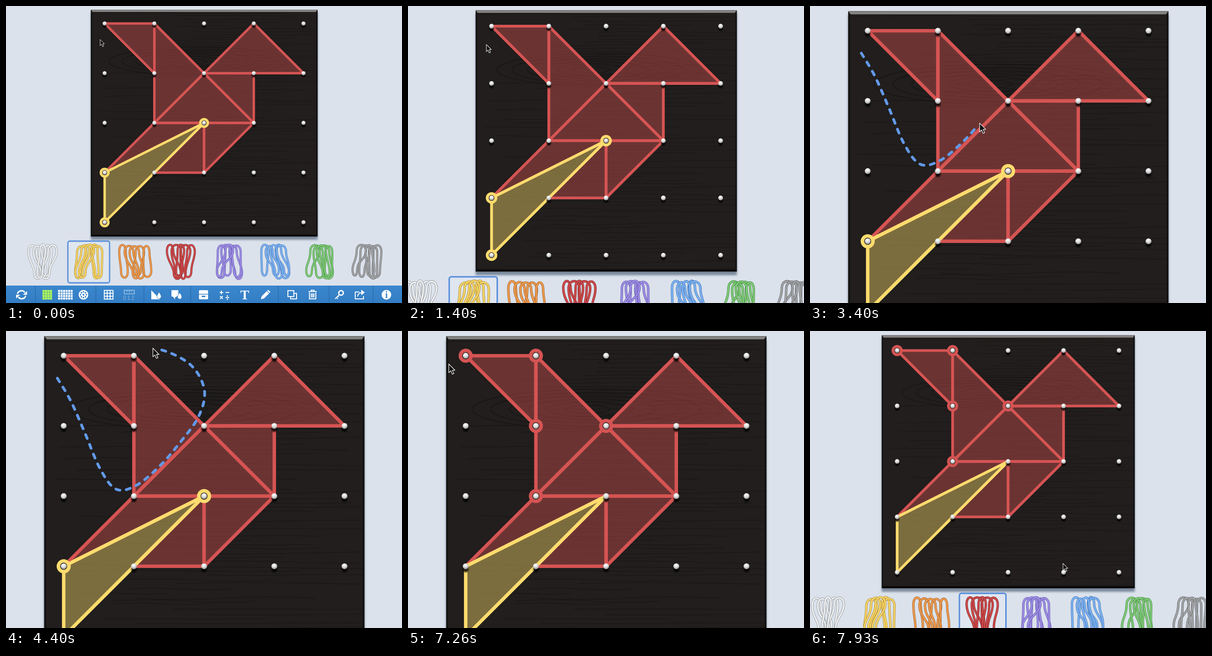
Animation of 864 by 648 pixels, one loop 8000 ms. Source, as an HTML page:

```html
<!DOCTYPE html>
<html lang="en">
<head>
<meta charset="utf-8">
<title>Geoboard</title>
<style>
html, body { margin: 0; width: 100%; height: 100%; overflow: hidden; background: #dbe2ec; }
svg { display: block; width: 100vw; height: 100vh; }
text { font-family: "Liberation Serif", serif; fill: #fff; text-anchor: middle; }
.line { fill: none; stroke: #fff; stroke-width: 2; }
.band { fill: none; stroke-linejoin: round; }
</style>
</head>
<body>
<svg viewBox="0 0 864 648">
  <defs>
    <radialGradient id="pinFill" cx=".45" cy=".3" r=".7">
      <stop offset="0" stop-color="#fff"/><stop offset=".5" stop-color="#dedede"/><stop offset="1" stop-color="#8f8f8f"/>
    </radialGradient>
    <linearGradient id="bevel" x2="0" y2="1">
      <stop offset="0" stop-color="#6c6d70"/><stop offset=".35" stop-color="#878683"/><stop offset="1" stop-color="#827f7a"/>
    </linearGradient>
    <linearGradient id="barFill" x2="0" y2="1">
      <stop offset="0" stop-color="#3a86cd"/><stop offset="1" stop-color="#337dc3"/>
    </linearGradient>
    <filter id="soft" x="-10%" y="-10%" width="120%" height="120%"><feGaussianBlur stdDeviation="2"/></filter>
    <filter id="pinSoft" x="-50%" y="-50%" width="200%" height="200%"><feGaussianBlur stdDeviation="1"/></filter>
    <clipPath id="boardClip"><rect x="188" y="13" width="489" height="487"/></clipPath>
    <ellipse id="pinShadow" cy="4.6" rx="4.2" ry="4.6" fill="#000" opacity=".85" filter="url(#pinSoft)"/>
    <circle id="pin" r="4.5" fill="url(#pinFill)"/>
    <path id="drop" d="M0-7C2-3 4.5-1 4.5 3A4.5 4.5 0 0 1-4.5 3C-4.5-1-2-3 0-7Z" fill="#fff" stroke="#3681c8"/>
  </defs>
  <g id="stage">
    <rect x="185" y="14" width="495" height="496" fill="#7c8a9d" filter="url(#soft)"/>
    <rect x="185" y="8" width="495" height="495" fill="#141312"/>
    <rect x="188" y="13" width="489" height="487" fill="#211e1d"/>
    <path d="M185 8H680L676 13H189Z" fill="url(#bevel)"/>
    <path d="M185 503L188 499H677L680 503Z" fill="#080707"/>
    <g id="grain" clip-path="url(#boardClip)" fill="none" stroke="#0e0d0c"></g>
    <g id="shapes"></g>
    <g id="shadows"></g>
    <g id="handlesBefore"></g>
    <g id="handlesAfter"></g>
    <g id="pins"></g>
    <rect id="choice" y="513" width="91" height="91" rx="4" fill="#dfe6ef" stroke="#5b8fdb" stroke-width="2.8"/>
    <g id="bundles"></g>
    <g id="toolbar">
      <rect y="610" width="864" height="40" fill="url(#barFill)"/>
      <path d="M64 610v40M196 610v40M301 610v40M403 610v40M594 610v40M705 610v40M801 610v40" stroke="#2b6dae" stroke-width="1.5"/>
    </g>
    <g transform="translate(432) scale(.7082) translate(-432)">
      <path id="lasso" fill="none" stroke="#6299e8" stroke-width="6" stroke-linecap="round" stroke-linejoin="round" stroke-dasharray="9 14"/>
    </g>
    <path id="cursor" d="M0 0V13.4L3.1 10.5 5.4 15.8 7.8 14.8 5.5 9.6H9.5Z" fill="#111" stroke="#f2f2f2" stroke-width=".9" stroke-linejoin="round"/>
  </g>
</svg>
<script>
const LOOP = 8000, ZOOM = 1.412, MID = 432;
const RED = '#d55453', YELLOW = '#fedc6e';
const el = id => document.getElementById(id);
const add = (id, markup) => el(id).insertAdjacentHTML('beforeend', markup);
const pinX = c => 215.2 + 108.48 * c, pinY = r => 38.2 + 108.45 * r;

let seed = 7;
const rand = () => (seed = seed * 16807 % 2147483647) / 2147483647;
const spread = n => (rand() - .5) * 2 * n;

function drawGrain() {
  let d = '';
  for (let y = 16; y < 500; y += 4 + rand() * 5) {
    const x = 188 + rand() * 250, w = 120 + rand() * 330;
    d += `M${x} ${y}q${w / 4} ${spread(4)} ${w / 2} 0t${w / 2} 0`;
  }
  add('grain', `<path d="${d}" opacity=".32" stroke-width="1.1"/>`);
  for (let i = 0; i < 6; i++)
    add('grain', `<ellipse cx="${404 + i * 3}" cy="121" rx="${34 + i * 32}" ry="${6 + i * 5}" opacity=".4" stroke-width="1.5"/>`);
  for (let i = 0; i < 3; i++)
    add('grain', `<ellipse cx="540" cy="122" rx="${25 + i * 22}" ry="${5 + i * 5}" opacity=".3" stroke-width="1.5"/>`);
}

function drawShapes() {
  const polygon = (corners, color) => {
    const points = corners.split(' ').map(([c, r]) => `${pinX(+c)},${pinY(+r)}`).join(' ');
    add('shapes', `<polygon class="band" points="${points}" style="fill:${color};fill-opacity:.41" stroke="${color}" stroke-width="5.3"/>`);
  };
  ['00 10 11', '10 21 12', '21 12 32', '21 31 32', '21 30 41', '03 12 22', '22 23 13', '22 23 32']
    .forEach(p => polygon(p, RED));
  polygon('03 04 22', YELLOW);
  for (let r = 0; r < 5; r++)
    for (let c = 0; c < 5; c++) {
      add('shadows', `<use href="#pinShadow" x="${pinX(c)}" y="${pinY(r)}"/>`);
      add('pins', `<use href="#pin" x="${pinX(c)}" y="${pinY(r)}"/>`);
    }
}

function drawHandles(id, corners, color) {
  for (const [c, r] of corners.split(' '))
    add(id, `<circle cx="${pinX(+c)}" cy="${pinY(+r)}" r="8.2" fill="#211d1b" fill-opacity=".8" stroke="${color}" stroke-width="5.4"/>`);
}

// Each bundle: band colour, edge colour, extent of the top ends, extent of the bottom ends.
const bundles = [
  ['#f1f2f3', '#8c9196', -31, 31, -32, 28], ['#f8d667', '#a58632', -26, 29, -30, 28],
  ['#ee9b4f', '#a45f22', -35, 31, -31, 35], ['#d04a4b', '#842526', -32, 29, -17, 31],
  ['#9f8fe6', '#6253aa', -22, 28, -32, 31], ['#7db3f3', '#3f72b3', -28, 26, -33, 33],
  ['#80cb79', '#43883f', -22, 26, -31, 32], ['#a3a4a6', '#66686b', -22, 32, -31, 29]];

function drawBundles() {
  bundles.forEach(([light, dark, topFrom, topTo, lowFrom, lowTo], n) => {
    const place = (from, to, w, i) => from + w + (to - from - 2 * w) * i / 4;
    let strands = '';
    for (const i of [0, 3, 1, 4, 2]) {
      const w = 6 + rand() * 5, v = 5 + rand() * 4;
      const top = place(topFrom, topTo, w, i);
      const low = place(lowFrom, lowTo, v, Math.max(0, Math.min(4, i + spread(1.6))));
      const y = -22 + spread(2), z = 21 + spread(4);
      const d = `M${top - w} ${y}C${top - w} ${y - 18} ${top + w} ${y - 18} ${top + w} ${y}` +
        `C${top + w} ${y + 17} ${low + v} ${z - 19} ${low + v} ${z}C${low + v} ${z + 17} ${low - v} ${z + 17} ${low - v} ${z}` +
        `C${low - v} ${z - 15} ${top - w} ${y + 21} ${top - w} ${y}Z`;
      strands += `<path d="${d}" stroke="${dark}" stroke-width="4.5"/><path d="${d}" stroke="${light}" stroke-width="3"/>`;
    }
    add('bundles', `<g class="band" transform="translate(${80 + n * 101} 558)">${strands}</g>`);
  });
}

function drawToolbar() {
  const icon = (x, markup) => add('toolbar', `<g transform="translate(${x} 630)">${markup}</g>`);
  const fill = d => `<path d="${d}" fill="#fff"/>`;
  const line = d => `<path class="line" d="${d}"/>`;
  const dots = (cols, rows, step, size, color) => {
    let d = '';
    for (let c = 0; c < cols; c++)
      for (let r = 0; r < rows; r++)
        d += `M${(c - (cols - 1) / 2) * step - size / 2} ${(r - (rows - 1) / 2) * step - size / 2}h${size}v${size}h${-size}z`;
    return `<path d="${d}" fill="${color}"/>`;
  };
  icon(34, `<g fill="none" stroke="#fff" stroke-width="3"><path d="M-9-2A9 9 0 0 1 7-5M9 2A9 9 0 0 1-7 5"/></g>` +
    fill('M12-8V0H3ZM-12 8V0H-3Z'));
  icon(90, `<rect x="-10.5" y="-10.5" width="21" height="21" fill="#62b070"/>` + dots(4, 4, 5.4, 4.4, '#b2fb67'));
  icon(129.5, dots(6, 4, 5.5, 4.3, '#fff'));
  let wheel = '';
  for (let a = 0; a < 8; a++) wheel += `<circle r="1.7" cx="6.3" transform="rotate(${a * 45})" fill="#3681c8"/>`;
  icon(169, `<circle r="10.5" fill="#fff"/><circle r="2" fill="#3681c8"/>${wheel}`);
  icon(224, line('M-9.5-9.5H9.5V9.5H-9.5ZM-3.2-9V9M3.2-9V9M-9-3.2H9M-9 3.2H9'));
  icon(269, `<g opacity=".42">${line('M-11-10H11V-2H-11ZM-5-10v4M0-10v5M5-10v4')}
    <text y="11" font-size="12" style="font-family:'Liberation Sans',sans-serif" letter-spacing="2.5">012</text></g>`);
  icon(327, fill('M-10-10V10H9Z') + '<use href="#drop" x="7" y="1"/>');
  icon(372, fill('M-11-10H4V3H0V5H-3V10L-8 4H-11Z') + '<use href="#drop" x="7" y="2"/>');
  icon(431, fill('M-10-8q0-2 2-2H8q2 0 2 2V-2H-10ZM-10-.5H10V8q0 2-2 2H-8q-2 0-2-2Z') +
    '<path d="M-4 2H4V5H-4Z" fill="#3681c8"/>');
  icon(476, line('M-10-5h8M-6-9v8M3-5h8M-9 3l6 6M-3 3l-6 6M3 6h8') +
    '<g fill="#fff"><circle cx="7" cy="2.5" r="1.5"/><circle cx="7" cy="9.5" r="1.5"/></g>');
  icon(521, '<text y="10" font-size="29" font-weight="bold">T</text>');
  icon(566, fill('M-10 10L-8 3L3-8L8-3L-3 8ZM4-9L6-11L11-6L9-4Z'));
  icon(624, line('M-9-9H4V4H-9ZM4-3H10V9H-3V4'));
  icon(669, line('M-9-7H9M-3-8V-10H3V-8M-7-5V9H7V-5M-3-3V6M0-3V6M3-3V6'));
  icon(727, '<circle class="line" cx="4" cy="-4" r="5" style="stroke-width:3"/>' + line('M0 0L-9 9M-6 6l3 3M-3 3l2 2'));
  icon(772, line('M-1-6H-10V9H8V3') + line('M-5 4Q-4-4 5-5') + fill('M3-11L11-5L3 1Z'));
  icon(830, '<circle r="10.5" fill="#fff"/><text y="6.5" font-size="20" font-weight="bold" style="fill:#3681c8">i</text>');
}

// Stroke of the selection loop, in zoomed-in coordinates, evenly spaced in time.
const START = 1930, STEP = 217.5, RELEASE = 5390;
const stroke = [[112, 103], [141, 152], [172, 222], [205, 300], [240, 345], [284, 337], [336, 294], [380, 243], [420, 187],
  [433, 130], [405, 76], [345, 43], [275, 32], [205, 20], [145, 15], [104, 35], [88, 72]];

function strokeAt(t) {
  const last = stroke.length - 1;
  const u = Math.max(0, Math.min(last, (t - START) / STEP));
  const i = Math.min(last - 1, Math.floor(u)), f = u - i;
  const at = k => stroke[Math.max(0, Math.min(last, k))];
  const [a, b, c, d] = [at(i - 1), at(i), at(i + 1), at(i + 2)];
  return [0, 1].map(k => b[k] + f / 2 * (c[k] - a[k] +
    f * (2 * a[k] - 5 * b[k] + 4 * c[k] - d[k] + f * (3 * (b[k] - c[k]) + d[k] - a[k]))));
}

const ease = (t, from, to) => (1 - Math.cos(Math.PI * Math.max(0, Math.min(1, (t - from) / (to - from))))) / 2;
const show = (id, on) => el(id).setAttribute('visibility', on ? 'visible' : 'hidden');

function cursorAt(t) {
  let [x, y] = t < RELEASE ? strokeAt(t) : [t < 7260 ? 88 : 89, 72];
  x = (x - MID) / ZOOM + MID;
  y /= ZOOM;
  const out = ease(t, 7440, 8000);
  return [x + (553 - x) * out, y + (470 - y) * out];
}

function render(t) {
  const scale = 1 + (ZOOM - 1) * (ease(t, 1100, 1825) - ease(t, 7445, 8199));
  el('stage').setAttribute('transform', `translate(${MID}) scale(${scale}) translate(${-MID})`);

  const drawing = t > START + 60 && t < RELEASE;
  show('lasso', drawing);
  if (drawing) {
    const points = [];
    for (let s = START; s < t - 45; s += 20) points.push(strokeAt(s));
    points.push(strokeAt(t - 45));
    el('lasso').setAttribute('d', 'M' + points.join('L'));
  }

  const selected = t >= RELEASE;
  show('handlesBefore', !selected);
  show('handlesAfter', selected);
  el('choice').setAttribute('x', selected ? 337 : 135);
  el('cursor').setAttribute('transform', `translate(${cursorAt(t)})`);
}

drawGrain();
drawShapes();
drawHandles('handlesBefore', '03 04 22', YELLOW);
drawHandles('handlesAfter', '00 10 11 21 12', RED);
drawBundles();
drawToolbar();

const begin = performance.now();
(function tick() {
  render((performance.now() - begin) % LOOP);
  requestAnimationFrame(tick);
})();
</script>
</body>
</html>
```
